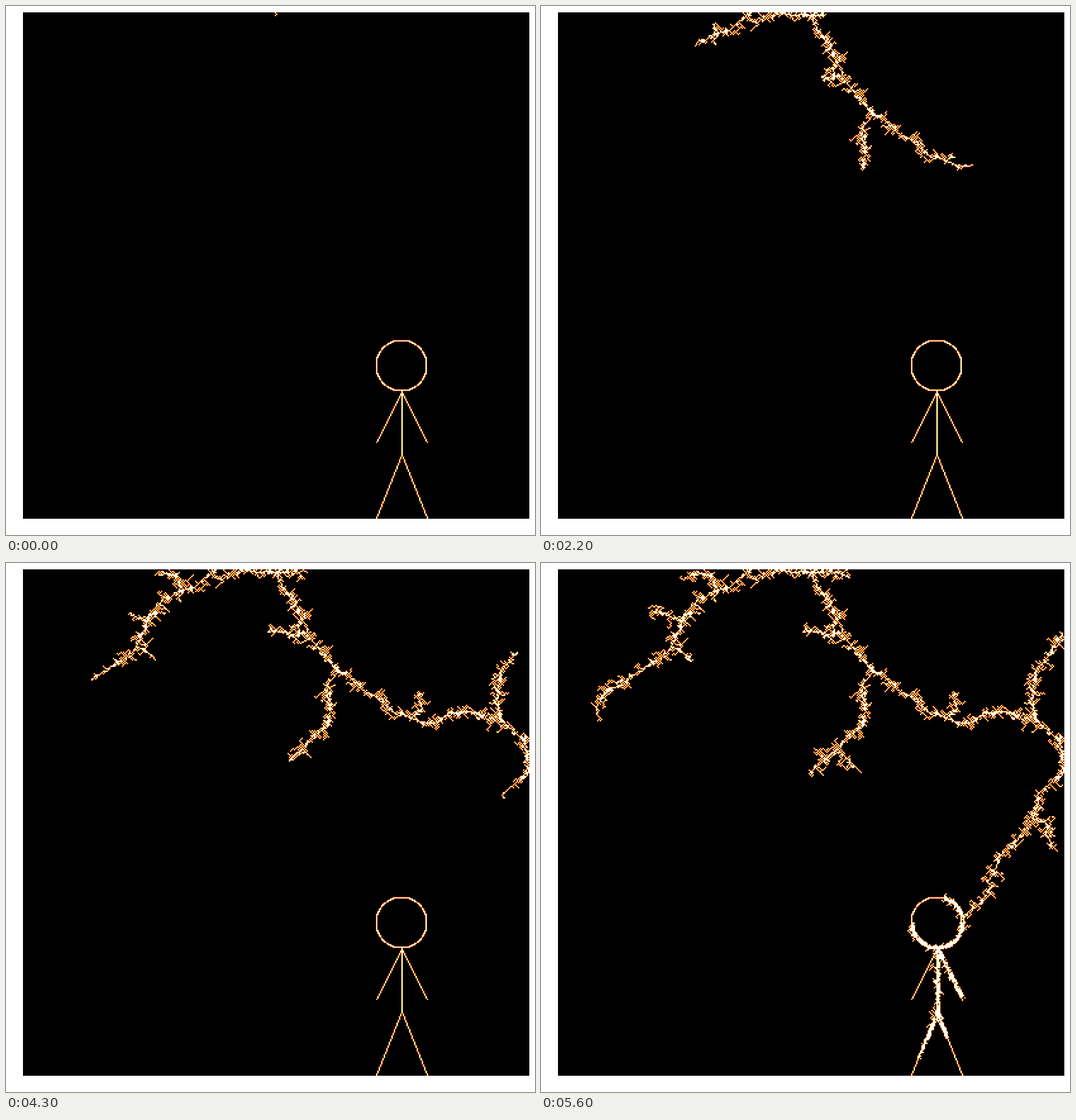
Recreate the animation shown at these times as an HTML page with a canvas. Size 748x748 px, loop 5700 ms.

```html
<!DOCTYPE html>
<html lang="en">
<head>
<meta charset="utf-8">
<title>Lightning strike</title>
<style>
  html, body { margin: 0; width: 100%; height: 100%; overflow: hidden; background: #fff; }
  canvas { position: absolute; left: 24px; top: 9px; }
</style>
</head>
<body>
<canvas id="sky" width="716" height="716"></canvas>
<script>
const N = 400, SIZE = 716, LEFT = 24, TOP = 9;
const STEP = 100, STEPS = 57;
const birth = new Float32Array(N * N).fill(Infinity); // step at which a cell lights up
const sprouts = [];

let seed = 4127;
function rnd() {
  seed = (seed + 0x6D2B79F5) | 0;
  let t = Math.imul(seed ^ (seed >>> 15), 1 | seed);
  t = (t + Math.imul(t ^ (t >>> 7), 61 | t)) ^ t;
  return ((t ^ (t >>> 14)) >>> 0) / 4294967296;
}

const inside = (x, y) => x >= 0 && y >= 0 && x < N && y < N;
const isLit = (x, y) => inside(x, y) && birth[y * N + x] < Infinity;
const unit = v => Math.max(-1, Math.min(1, Math.round(v)));
const clampCell = v => Math.max(0, Math.min(N - 1, v));
const toCell = px => clampCell(Math.floor(px / SIZE * N));

function light(x, y, t) {
  if (inside(x, y)) birth[y * N + x] = Math.min(birth[y * N + x], t);
}

function grow(x, y, t) {
  light(x, y, t);
  sprouts.push({ x, y, t });
}

// Straight cell line; halves round towards the start.
function line(x0, y0, x1, y1, plot) {
  const dx = x1 - x0, dy = y1 - y0;
  const n = Math.max(Math.abs(dx), Math.abs(dy));
  const shift = (d, i) => Math.sign(d) * Math.ceil(Math.abs(d) * i / n - .5);
  for (let i = 0; i <= n; i++) plot(x0 + shift(dx, i), y0 + shift(dy, i), i / n);
}

// Jagged channel through stage points, growing evenly from step t0 to t1.
function bolt(t0, t1, ...points) {
  const cells = points.map(([px, py]) => [toCell(px - LEFT), toCell(py - TOP)]);
  const span = (a, b) => Math.max(Math.abs(b[0] - a[0]), Math.abs(b[1] - a[1]), 1);
  const total = cells.slice(1).reduce((sum, c, i) => sum + span(cells[i], c), 0);
  let [x, y] = cells[0], done = 0;
  cells.slice(1).forEach((goal, s) => {
    const n = span(cells[s], goal);
    for (let i = 1; i < 3 * n; i++) {
      const dx = goal[0] - x, dy = goal[1] - y;
      const m = Math.max(Math.abs(dx), Math.abs(dy));
      if (m < 2) break;
      x = clampCell(x + unit(dx / m + (rnd() - .5) * 1.8));
      y = clampCell(y + unit(dy / m + (rnd() - .5) * 1.8));
      grow(x, y, t0 + (t1 - t0) * (done + Math.min(i, n)) / total);
    }
    done += n;
  });
}

// Diagonal side growth that stops where it would touch other cells.
function twig(x, y, t, length, depth) {
  let dx = rnd() < .5 ? 1 : -1, dy = rnd() < .5 ? 1 : -1;
  const pace = .25 + rnd() * .8;
  for (let k = 0; k < length; k++) {
    if (rnd() < .25) dx = -dx;
    else if (rnd() < .33) dy = -dy;
    x += dx;
    y += rnd() < .12 ? 0 : dy;
    const beside = isLit(x + 1, y) + isLit(x - 1, y) + isLit(x, y + 1) + isLit(x, y - 1);
    if (!inside(x, y) || (k && beside > 1)) return;
    t += pace;
    light(x, y, t);
    if (depth && rnd() < .3) twig(x, y, t, 2 + Math.floor(rnd() * 4), depth - 1);
  }
}

function drawFigure() {
  const dot = (x, y) => light(x, y, 0);
  for (let a = .002; a < 2 * Math.PI; a += .005)
    dot(Math.floor(299 + 20 * Math.cos(a)), Math.floor(279 + 20 * Math.sin(a)));
  line(299, 299, 299, 349, dot);
  for (const x of [279, 319]) {
    line(299, 299, x, 339, dot);
    line(299, 349, x, 399, dot);
  }
}

// The charge runs along the figure and thickens its outline.
function strikeFigure(hit) {
  const soak = (x, y, t) => {
    for (let j = -1; j < 2; j++)
      for (let i = 0; i < 3; i++)
        if (rnd() < .5) light(x + i, y + j, t + rnd());
    grow(x, y, t);
  };
  const run = (x0, y0, x1, y1, t0, t1) =>
    line(x0, y0, x1, y1, (x, y, k) => soak(x, y, t0 + (t1 - t0) * k));

  for (let a = -75; a < 180; a += 3) {
    const r = a * Math.PI / 180;
    soak(Math.floor(299 + 20 * Math.cos(r)), Math.floor(279 + 20 * Math.sin(r)), hit + Math.abs(a) / 60);
  }
  run(299, 299, 299, 349, hit + 1.2, hit + 2.5);
  run(299, 299, 319, 339, hit + 1.4, hit + 4);
  run(299, 349, 284, 385, hit + 2.5, hit + 4.5);
  run(299, 349, 306, 370, hit + 2.5, hit + 4.5);
}

function buildLightning() {
  line(199, 0, 200, 1, (x, y) => light(x, y, 0));
  light(199, 2, 0);

  // right channel, down to the head
  bolt(0, 13.5, [382, 11], [413, 68], [414, 101], [428, 102], [469, 150], [538, 197]);
  bolt(13.5, 35, [538, 197], [547, 213], [600, 228], [640, 212], [700, 222], [737, 245]);
  bolt(35, 45, [737, 245], [737, 300], [700, 328], [698, 361]);
  bolt(45, 51.3, [698, 361], [645, 420], [636, 470], [598, 502]);
  bolt(29, 45, [700, 222], [700, 150], [740, 97]);
  bolt(45, 53, [698, 361], [720, 374], [723, 402]);
  bolt(18, 36, [574, 215], [592, 208], [587, 181]);

  // left channel
  bolt(0, 14, [382, 11], [322, 13], [305, 23], [290, 13], [250, 38]);
  bolt(14, 35, [250, 38], [222, 50], [186, 118]);
  bolt(35, 50, [186, 118], [127, 158], [75, 195], [79, 218]);
  bolt(30, 46, [212, 72], [191, 78], [160, 67]);
  bolt(35, 43, [186, 118], [212, 139]);
  bolt(14, 46, [248, 36], [241, 13], [206, 14]);

  // middle channel
  bolt(10, 16, [469, 150], [452, 185], [460, 214]);
  bolt(16, 48, [460, 214], [457, 231], [420, 260], [377, 299]);
  bolt(39, 46, [418, 262], [441, 291]);
  bolt(7, 38, [414, 101], [370, 97]);
  bolt(2, 46, [384, 12], [437, 17]);

  strikeFigure(51.3);
  for (const { x, y, t } of sprouts)
    if (rnd() < .75) twig(x, y, t, 2 + Math.floor(rnd() * rnd() * 9), 2);
}

// Cosine-window sampling from cells to pixels.
const samples = Array.from({ length: SIZE }, (_, i) => {
  const u = (i + .5) / SIZE * N - .5, a = Math.floor(u);
  return { a: clampCell(a), b: clampCell(a + 1), w: .5 + .5 * Math.cos(Math.PI * (u - a)) };
});

const ctx = document.getElementById('sky').getContext('2d');
const image = ctx.createImageData(SIZE, SIZE);
const mixed = new Float32Array(N);

function render(step) {
  const glow = i => birth[i] <= step ? 1 : 0;
  const out = image.data;
  let p = 0;
  for (const { a, b, w } of samples) {
    for (let x = 0; x < N; x++) mixed[x] = glow(a * N + x) * w + glow(b * N + x) * (1 - w);
    for (const s of samples) {
      const v = 510 * (mixed[s.a] * s.w + mixed[s.b] * (1 - s.w));
      out[p++] = v;
      out[p++] = v - 127.5;
      out[p++] = v - 255;
      out[p++] = 255;
    }
  }
  ctx.putImageData(image, 0, 0);
}

let shown = -1;
function tick() {
  const step = Math.floor(performance.now() / STEP) % STEPS;
  if (step !== shown) render(shown = step);
  requestAnimationFrame(tick);
}

drawFigure();
buildLightning();
tick();
</script>
</body>
</html>
```
